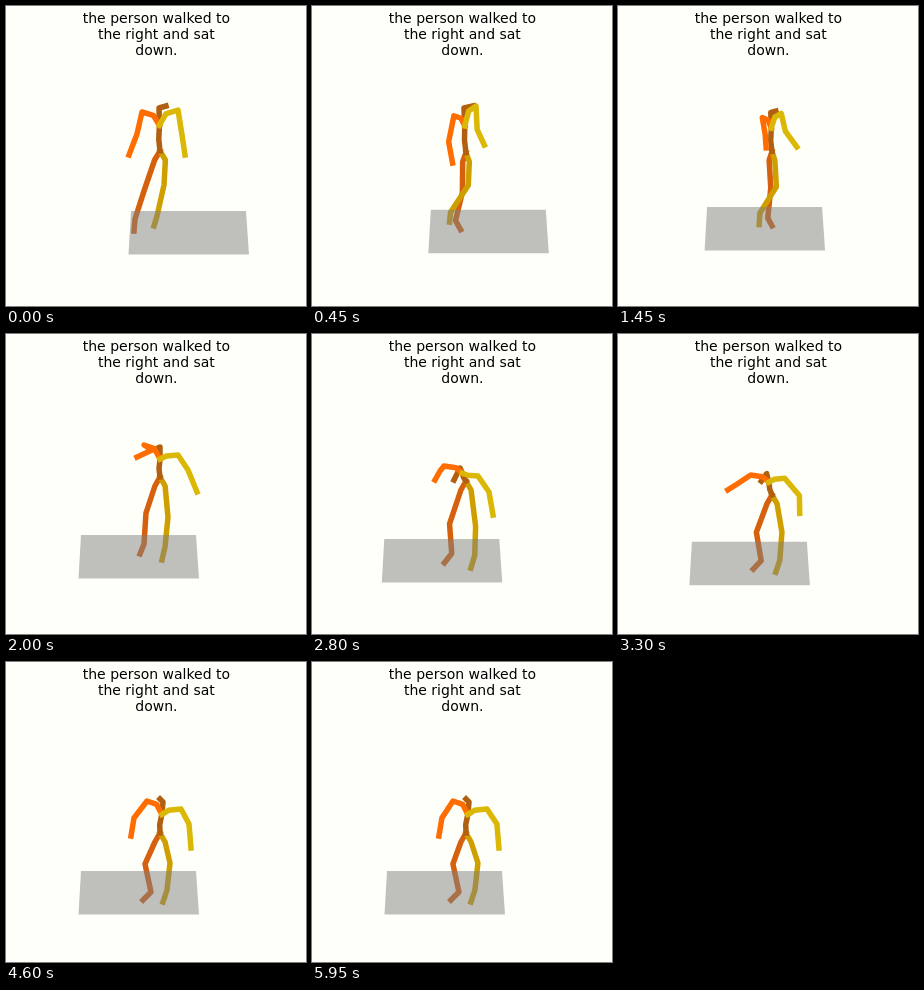
Write an HTML page with a canvas that moves like this. It is 300x300 px and loops after 6000 ms.

```html
<!DOCTYPE html>
<html lang="en">
<head>
<meta charset="utf-8">
<title>Walking figure</title>
<style>
  html, body { margin: 0; width: 100%; height: 100%; overflow: hidden; background: #fffffa; }
  canvas { display: block; }
</style>
</head>
<body>
<canvas id="stage" width="300" height="300"></canvas>
<script>
const ctx = document.getElementById('stage').getContext('2d');
const LOOP = 6000, STEP = 50, SETTLED = 4600;
const caption = ['the person walked to', 'the right and sat', 'down.'];

// Key poses. A part left out of a pose moves on between its neighbours.
// span: half the shoulder line; arms: elbow, wrist; legs: knee, ankle, toe.
const poses = [
  { at: 0, floor: [125, 205], root: [154, 145], neck: [154, 105], span: [18, -1], head: [160, 100],
    rightArm: [131, 128, 123, 149], leftArm: [176, 129, 179, 149],
    rightLeg: [138, 185, 129, 213, 128, 225], leftLeg: [158, 179, 151, 210, 148, 220] },
  { at: 900, floor: [107, 202], root: [154, 148], neck: [152, 106], span: [4, -8], head: [162, 101],
    rightArm: [144, 142, 159, 162], leftArm: [155, 119, 167, 130],
    rightLeg: [163, 187, 159, 216, 170, 222], leftLeg: [155, 180, 127, 203, 128, 213] },
  { at: 2000, floor: [75, 201], root: [154, 143], neck: [155, 116], span: [17, 5], head: [152, 114],
    rightArm: [146, 116, 131, 123], leftArm: [182, 136, 191, 158],
    rightLeg: [140, 179, 138, 210, 134, 220], leftLeg: [162, 183, 159, 213, 156, 226] },
  { at: 2800, root: [154, 147], neck: [149, 137], span: [17, 5], head: [142, 146],
    rightArm: [128, 137, 123, 146], leftArm: [177, 158, 181, 181] },
  { at: 3800, floor: [75, 209], root: [154, 171], neck: [152, 145], span: [17, -1], head: [147, 143],
    rightArm: [114, 160, 101, 164], leftArm: [186, 162, 184, 176],
    rightLeg: [139, 202, 145, 230, 137, 238], leftLeg: [164, 201, 161, 228, 157, 240] },
  { at: SETTLED, neck: [158, 143], span: [17, 4], head: [154, 137],
    rightArm: [128, 156, 125, 174], leftArm: [183, 162, 185, 186] }
];

const clamp = u => Math.min(Math.max(u, 0), 1);
const mix = (a, b, u) => a + (b - a) * u;

// Smooth curve through the keys of one part, at rest at both ends.
function sample(part, t) {
  const keys = poses.filter(pose => pose[part]);
  const last = keys.length - 1;
  let i = 0;
  while (i < last - 1 && t >= keys[i + 1].at) i++;
  const span = keys[i + 1].at - keys[i].at;
  const u = clamp((t - keys[i].at) / span);
  const slope = (k, n) => {
    if (k === 0 || k === last) return 0;
    const a = keys[k - 1], b = keys[k + 1];
    return (b[part][n] - a[part][n]) / (b.at - a.at) * span;
  };
  return keys[i][part].map((p, n) => {
    const q = keys[i + 1][part][n], d = slope(i, n), e = slope(i + 1, n);
    return p + u * (d + u * (3 * (q - p) - 2 * d - e + u * (2 * (p - q) + d + e)));
  });
}

function stroke(points, color) {
  ctx.strokeStyle = color;
  ctx.beginPath();
  for (let i = 0; i < points.length; i += 2) ctx.lineTo(points[i], points[i + 1]);
  ctx.stroke();
}

function drawFloor([x, y]) {
  ctx.fillStyle = 'rgba(128,128,128,0.5)';
  ctx.beginPath();
  ctx.moveTo(x, y);
  ctx.lineTo(x + 115, y);
  ctx.lineTo(x + 118, y + 43.5);
  ctx.lineTo(x - 2.5, y + 43.5);
  ctx.fill();
}

function drawFigure(t) {
  const root = sample('root', t), span = sample('span', t);
  const shoulders = sample('neck', t);
  const neck = [shoulders[0] - 1, shoulders[1] - 3];
  const chest = root.map((r, n) => mix(r, neck[n], 0.6));
  const waist = [mix(root[0], chest[0], 0.4) - 1, mix(root[1], chest[1], 0.45)];

  const sway = 2 * clamp((t - SETTLED) / (LOOP - SETTLED));
  const limb = part => sample(part, t).map((v, n) => n % 2 ? v : v + sway);

  const leg = (part, side, color) => {
    const hip = [root[0] + side * span[0] * 0.3, root[1] + 9];
    stroke([...root, ...hip, ...limb(part)], color);
  };
  const arm = (part, side, color) => {
    const shoulder = shoulders.map((s, n) => s + side * span[n]);
    const collar = [mix(chest[0], shoulder[0], 0.35), mix(chest[1], shoulder[1], 0.75)];
    stroke([...chest, ...collar, ...shoulder, ...limb(part)], color);
  };

  leg('rightLeg', -1, '#d5610f');
  leg('leftLeg', 1, '#cf9f00');
  drawFloor(sample('floor', t));
  stroke([...root, ...waist, ...chest, ...neck, ...sample('head', t)], '#b06010');
  arm('rightArm', -1, '#ff6d00');
  arm('leftArm', 1, '#dbb706');
}

function draw(t) {
  ctx.fillStyle = '#fffffa';
  ctx.fillRect(0, 0, 300, 300);

  ctx.fillStyle = '#000';
  ctx.font = '14px "DejaVu Sans", sans-serif';
  ctx.textAlign = 'center';
  caption.forEach((line, i) => ctx.fillText(line, 150.4, 17 + 16 * i));

  ctx.lineWidth = 5.5;
  ctx.lineCap = 'square';
  ctx.lineJoin = 'round';
  drawFigure(t);
}

const start = performance.now();
function tick() {
  const t = (performance.now() - start) % LOOP;
  draw(Math.floor(t / STEP) * STEP);
  requestAnimationFrame(tick);
}
tick();
</script>
</body>
</html>
```
